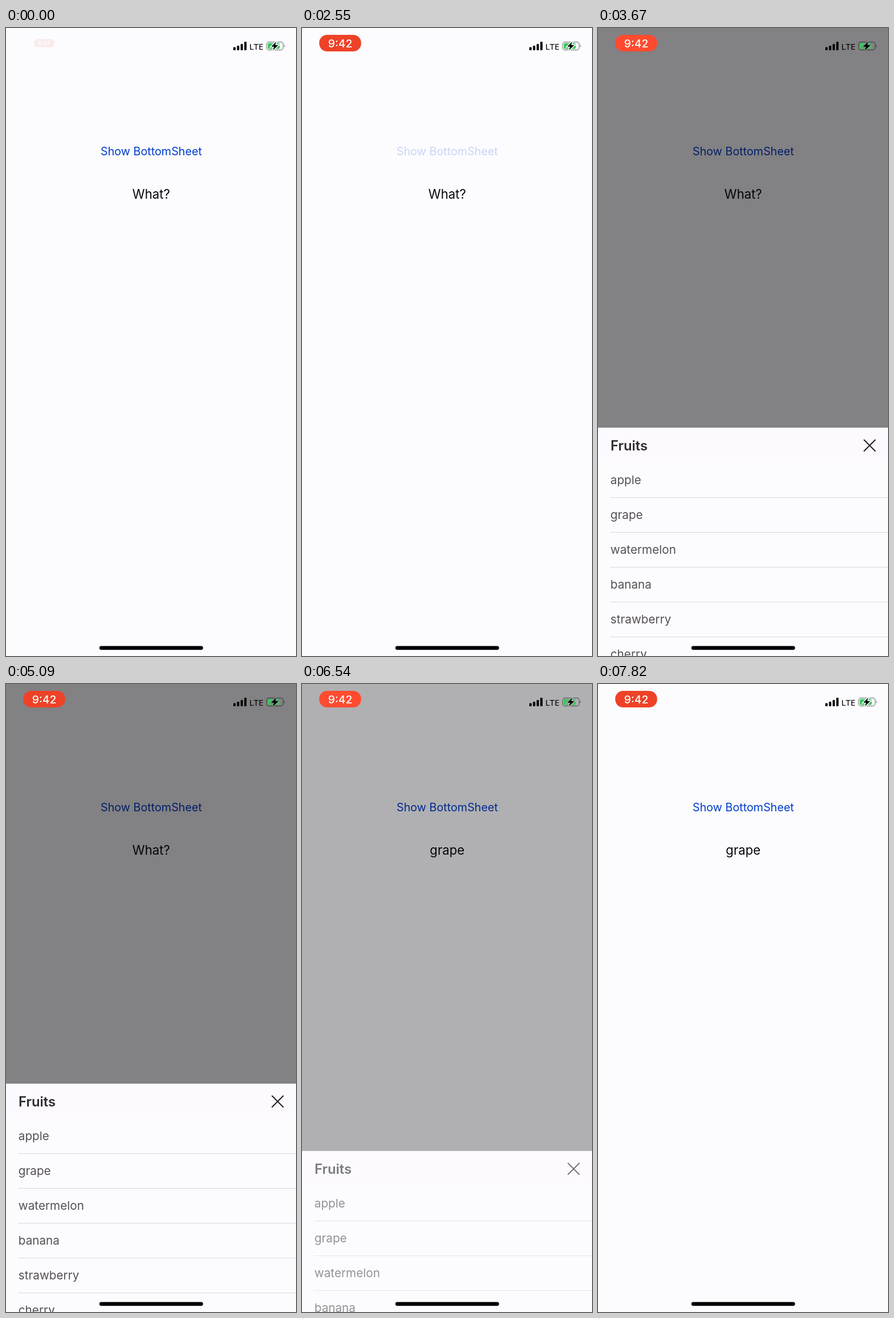
Write an HTML page that moves like this. It is 509x1100 px and loops after 8 s.

```html
<!DOCTYPE html>
<html lang="en">
<head>
<meta charset="utf-8">
<title>Bottom sheet</title>
<style>
  html, body { margin: 0; width: 100%; height: 100%; overflow: hidden; background: #fcfcff; }
  svg { display: block; width: 100vw; height: 100vh; }
  text { font-family: Inter, Roboto, sans-serif; font-optical-sizing: none; }
  .mid { text-anchor: middle; }
  .row { font-size: 20.7px; fill: #555053; }
</style>
</head>
<body>
<svg viewBox="0 0 509 1100" xmlns="http://www.w3.org/2000/svg">
  <defs>
    <mask id="cut">
      <rect x="450" y="18" width="45" height="28" fill="#fff"/>
      <path d="M474 24 L465.5 32.7 H470.5 L468.5 39 L478 30 H472.6 Z" fill="#000" stroke="#000" stroke-width="3"/>
    </mask>
  </defs>
  <rect width="509" height="1100" fill="#fcfcff"/>
  <text id="button" class="mid" x="255" y="223" font-size="19.75" fill="#003ccb">Show BottomSheet</text>
  <text id="label" class="mid" x="254.8" y="299" font-size="22.2" fill="#08060a">What?</text>

  <g id="modal">
    <rect id="dim" width="509" height="1100" fill="#030004" opacity=".49"/>
    <g id="sheet">
      <rect width="509" height="1100" fill="#fcfcff"/>
      <rect width="509" height="60" fill="#fcf9ff"/>
      <text x="22" y="39.5" font-size="23.8" font-weight="600" fill="#2e2c30">Fruits</text>
      <path d="M466.5 21 L487 41.5 M487 21 L466.5 41.5" stroke="#1c1a1e" stroke-width="1.8"/>
      <g id="list"></g>
    </g>
  </g>

  <g id="pill">
    <rect id="capsule" x="30.2" y="12" width="73.6" height="29" rx="14"/>
    <text class="mid" x="67" y="33.5" font-size="19.3" font-weight="500" fill="#fff">9:42</text>
  </g>
  <g id="signal"></g>
  <text x="427" y="38" font-size="15.3" font-weight="500" style="font-family:'Noto Sans',sans-serif">LTE</text>
  <g mask="url(#cut)">
    <rect x="457.5" y="24.5" width="29" height="14" rx="4" fill="none" stroke="#000" stroke-opacity=".42" stroke-width="1.4"/>
    <rect x="459.5" y="26.5" width="21" height="10" rx="2.2" fill="#34c759"/>
  </g>
  <path d="M488 29 q2.6 2.5 0 5 Z" fill="#000" opacity=".45"/>
  <path d="M474 24 L465.5 32.7 H470.5 L468.5 39 L478 30 H472.6 Z" fill="#000"/>
  <rect x="163.9" y="1082.4" width="182" height="6.8" rx="3.4" fill="#000"/>
</svg>
<script>
const LOOP = 8000, OPEN_AT = 2560, CLOSE_AT = 6195, SLIDE = 837, FADE = 800;
const TOP = 700, TRAVEL = 335, ROW = 61;
const el = id => document.getElementById(id);

function add(parent, tag, attrs, content = '') {
  const node = document.createElementNS('http://www.w3.org/2000/svg', tag);
  for (const key in attrs) node.setAttribute(key, attrs[key]);
  node.textContent = content;
  return parent.appendChild(node);
}

['apple', 'grape', 'watermelon', 'banana', 'strawberry', 'cherry'].forEach((name, i) => {
  const y = ROW * (i + 1);
  add(el('list'), 'rect', { x: 21, y: y + ROW, width: 488, height: 1, fill: '#d8d7e0' });
  if (name === 'grape') {
    add(el('list'), 'rect', { id: 'press', y, width: 509, height: ROW + .5, fill: '#d4d1d6' });
  }
  add(el('list'), 'text', { class: 'row', x: 21.8, y: y + 38 }, name);
});

[5.5, 8, 11, 15].forEach((h, i) =>
  add(el('signal'), 'rect', { x: 399 + i * 6.4, y: 39 - h, width: 4, height: h, rx: 1 }));

const ramp = (t, start, length) => Math.min(1, Math.max(0, (t - start) / length));
const mix = (a, b, k) => a + (b - a) * k;

// Standard ease-in-out: cubic-bezier(.42, 0, .58, 1)
function ease(x) {
  let lo = 0, hi = 1;
  for (let i = 0; i < 22; i++) {
    const s = (lo + hi) / 2, r = 1 - s;
    if (1.26 * s * r * r + 1.74 * s * s * r + s * s * s < x) lo = s; else hi = s;
  }
  return lo * lo * (3 - 2 * lo);
}

// 0 while the sheet is away, 1 while it is open
const presence = (t, length) => ease(ramp(t, OPEN_AT, length)) - ease(ramp(t, CLOSE_AT, length));

function drawPill(t) {
  const grow = 1 - (1 - ramp(t, 0, 420)) ** 3;
  const size = mix(.5, 1, grow);
  el('pill').setAttribute('transform', `translate(67 26.5) scale(${size}) translate(-67 -26.5)`);
  el('pill').setAttribute('opacity', mix(.08, 1, ramp(t, 0, 300)));
  const glow = .5 - .5 * Math.cos((t - 2550) / 2635 * 2 * Math.PI);
  const rgb = [[238, 255], [66, 75], [40, 48]].map(([a, b]) => Math.round(mix(a, b, glow)));
  el('capsule').setAttribute('fill', `rgb(${rgb})`);
}

function draw(t) {
  drawPill(t);

  const pressed = ramp(t, 2260, 120) - ease(ramp(t, 2590, 280));
  el('button').setAttribute('opacity', mix(1, .2, pressed));
  el('label').textContent = t < 6180 ? 'What?' : 'grape';

  const fade = presence(t, FADE);
  const lift = TRAVEL * (1 - presence(t, SLIDE));
  el('modal').setAttribute('opacity', fade);
  el('modal').setAttribute('display', fade > .0005 ? 'inline' : 'none');
  el('sheet').setAttribute('transform', `translate(0 ${Math.round(TOP + lift)})`);
  el('press').setAttribute('opacity', t < 6060 ? 0 : 1 - ease(ramp(t, 6200, 300)));
}

const began = performance.now();
function tick() {
  draw((performance.now() - began) % LOOP);
  requestAnimationFrame(tick);
}
tick();
</script>
</body>
</html>
```
